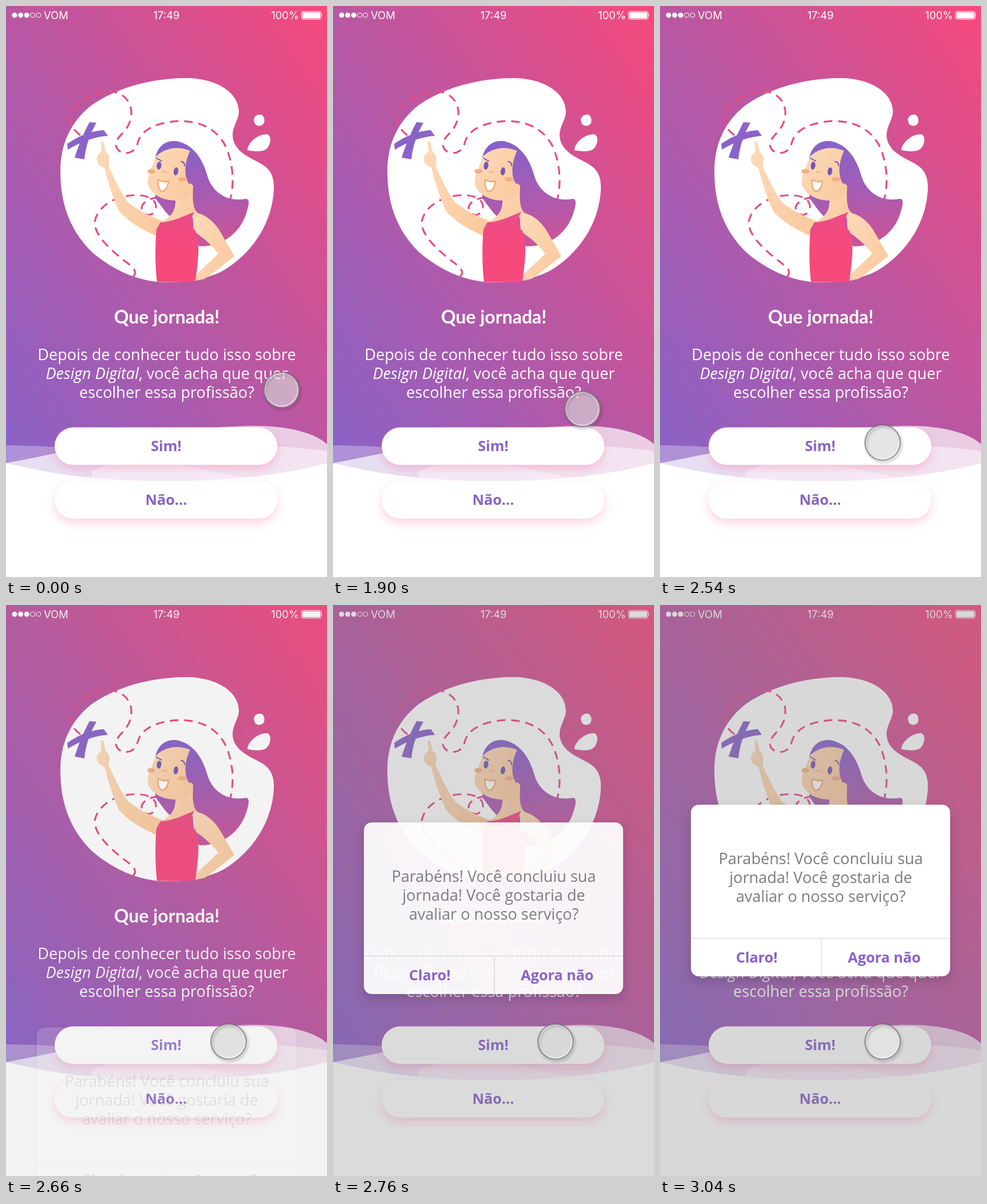
Animation, 561 px wide and 998 px high, one loop 4480 ms. Source, as an HTML page:

```html
<!DOCTYPE html>
<html lang="pt">
<head>
<meta charset="utf-8">
<style>
html, body { margin: 0; width: 100%; height: 100%; overflow: hidden; background: #fff; }
svg { display: block; width: 561px; height: 998px; }
text { font-family: "Open Sans", "Noto Sans", sans-serif; text-anchor: middle; }
.status { font: 18.4px Inter, Roboto, sans-serif; fill: #fff; }
.title { font: 700 32px Lato, "Open Sans", sans-serif; fill: #fff; }
.copy { font-size: 27.1px; }
.label { font-size: 25.2px; font-weight: 700; fill: #8862c6; }
.trail { fill: none; stroke: #ea4a82; stroke-width: 3.2; stroke-dasharray: 15 10; }
.line { fill: none; stroke-linecap: round; }
</style>
</head>
<body>
<svg viewBox="0 0 561 998">
  <defs>
    <linearGradient id="sky" x1="0" y1="1" x2="1" y2="0">
      <stop stop-color="#8663c9"/><stop offset=".55" stop-color="#be569f"/><stop offset="1" stop-color="#f6497c"/>
    </linearGradient>
    <linearGradient id="hair" gradientUnits="userSpaceOnUse" x1="300" y1="250" x2="340" y2="420">
      <stop stop-color="#8862c8"/><stop offset="1" stop-color="#c9549a"/>
    </linearGradient>
    <linearGradient id="skin" x1="0" y1="0" x2="1" y2=".6">
      <stop stop-color="#fcdabb"/><stop offset="1" stop-color="#fbcba0"/>
    </linearGradient>
    <linearGradient id="dress" x1="0" y1="0" x2="0" y2="1">
      <stop stop-color="#e94d86"/><stop offset=".5" stop-color="#f6497c"/>
    </linearGradient>
    <filter id="glow" x="-20%" y="-60%" width="140%" height="240%">
      <feDropShadow dx="0" dy="7" stdDeviation="8" flood-color="#f6497c" flood-opacity=".25"/>
    </filter>
    <filter id="shade" x="-20%" y="-20%" width="140%" height="150%">
      <feDropShadow dx="0" dy="8" stdDeviation="10" flood-opacity=".17"/>
    </filter>
    <filter id="drop" x="-30%" y="-30%" width="160%" height="160%">
      <feDropShadow dx="2" dy="3" stdDeviation="2" flood-opacity=".5"/>
    </filter>
  </defs>

  <rect width="561" height="998" fill="#fff"/>
  <rect width="561" height="835" fill="url(#sky)"/>
  <g fill="#fff">
    <path opacity=".3" d="M0 768C160 768 300 800 440 830V840H0Z"/>
    <path opacity=".7" d="M0 799C130 774 290 737 420 734C490 732 540 746 561 766V840H0Z"/>
    <path opacity=".45" d="M150 812C260 770 420 758 561 778V840H150Z"/>
    <path d="M0 799C60 812 130 830 280 830C400 830 490 818 561 799V998H0Z"/>
  </g>

  <g class="status">
    <circle cx="15" cy="16" r="4.5"/><circle cx="25.6" cy="16" r="4.5"/><circle cx="36.2" cy="16" r="4.5"/>
    <g fill="none" stroke="#fff"><circle cx="46.6" cy="16" r="4"/><circle cx="56.8" cy="16" r="4"/>
      <rect x="516.5" y="9.5" width="34" height="13.5" rx="2.5"/></g>
    <rect x="518" y="11" width="31" height="10.5" rx="1"/>
    <path d="M551.5 13.5q2 2.500 0 5.500z"/>
    <text class="status" x="66" y="22.5" style="text-anchor:start">VOM</text>
    <text class="status" x="280.5" y="22.5">17:49</text>
    <text class="status" x="512" y="22.5" style="text-anchor:end">100%</text>
  </g>

  <g fill="#fff">
    <path d="M315 126C365 126 408 150 407 186C406 200 396 210 396 226C397 256 430 266 448 277C466 288 469 305 468 322C465 375 436 424 390 456C361 476 320 483 282 483C235 483 190 464 150 430C108 388 95 340 95 288C95 240 115 200 150 173C195 142 255 126 315 126Z"/>
    <path d="M433 199C434 192 440 189 446 190C452 193 453 201 450 206C446 211 438 210 435 206Z"/>
    <path d="M422 250C424 238 440 224 456 224C464 226 464 240 456 249C450 256 432 254 422 252Z"/>
  </g>
  <path class="trail" d="M130 226C115 215 108 200 114 186C124 165 155 149 180 149C207 150 220 170 219 188C218 220 192 225 192 243C195 262 225 262 230 240C236 213 270 202 305 201C345 202 372 218 386 250C399 285 398 315 391 342"/>
  <path class="trail" d="M222 473C232 464 220 455 208 446C185 428 154 402 155 377C160 350 190 333 220 331C248 329 263 338 262 352C259 370 238 369 237 352C240 340 255 335 272 334"/>
  <g fill="#8a63c8">
    <path d="M107 241Q138 219 171 217L178 227Q145 229 108 251Z"/>
    <path d="M146 203L158 204Q140 235 137 268L120 265Q131 230 146 203Z"/>
  </g>

  <path fill="url(#hair)" d="M261 264C266 244 280 235 296 236C327 240 344 268 352 297C361 327 388 343 419 337C427 337 424 349 421 359C411 395 380 421 338 420L294 374C280 364 272 350 261 336Z"/>
  <g fill="url(#skin)">
    <path d="M296 335C297 352 294 367 270 378L300 388L336 362C326 356 326 338 327 315Z"/>
    <path d="M263 260C280 243 303 243 322 253C311 275 311 298 320 311L328 308C327 330 311 341 294 340C273 339 254 330 248 312C246 295 256 282 263 260Z"/>
    <path d="M165 239C167 235 171 236 171 241L174 255C182 261 182 270 179 279C190 303 200 325 213 343C235 360 255 369 274 376L263 402C240 392 215 378 198 359C186 334 178 306 172 283C163 280 157 273 159 265C160 259 165 257 167 253Z"/>
    <path d="M326 361C345 361 362 375 373 392L399 437C380 452 362 467 347 477L322 482C337 463 357 447 371 433C359 417 345 405 328 394Z"/>
  </g>
  <path fill="url(#hair)" d="M262 263C280 246 302 245 322 253C310 280 312 307 331 316C346 300 332 240 296 236C277 235 266 247 262 263Z"/>
  <path fill="url(#dress)" d="M270 378C287 378 307 369 329 360C321 374 322 385 331 393C339 410 337 440 331 481Q300 484 264 482C260 450 261 410 263 390Z"/>
  <g fill="#f5ae84"><ellipse cx="254" cy="289" rx="7" ry="4"/><ellipse cx="308" cy="303" rx="8" ry="4"/></g>
  <g fill="#7458b8">
    <ellipse cx="267.5" cy="279" rx="4" ry="7" transform="rotate(8 267 279)"/>
    <ellipse cx="297" cy="289" rx="4" ry="7" transform="rotate(8 297 289)"/>
  </g>
  <path class="line" stroke="#7458b8" stroke-width="2" d="M263 266L272 271M306 272Q312 272 312 279"/>
  <path class="line" stroke="#f0a878" stroke-width="1.5" d="M273 291Q277 287 281 291"/>
  <path fill="#fff" stroke="#f3ac79" stroke-width="2.5" d="M266 304Q274 309 284 306Q282 324 271 324Q264 316 266 304Z"/>

  <text class="title" x="281" y="555">Que jornada!</text>
  <g fill="#fff">
    <text class="copy" x="281" y="619">Depois de conhecer tudo isso sobre</text>
    <text class="copy" x="281" y="652"><tspan font-style="italic">Design Digital</tspan>, você acha que quer</text>
    <text class="copy" x="281" y="685">escolher essa profissão?</text>
  </g>
  <g fill="#fff" filter="url(#glow)">
    <rect x="85" y="736.5" width="389" height="65.5" rx="32.7"/>
    <rect x="85" y="830.5" width="389" height="65.5" rx="32.7"/>
  </g>
  <text class="label" x="280" y="778">Sim!</text>
  <text class="label" x="280" y="872">Não...</text>

  <rect id="dim" width="561" height="998" fill="#7d7d80"/>

  <g id="card">
    <rect x="54" y="349" width="453" height="300" rx="14" fill="#fff" filter="url(#shade)"/>
    <path d="M54 582.5H507M282 582.5V649" stroke="#dedede" stroke-width="1.5"/>
    <g fill="#7c7c80">
      <text class="copy" x="281" y="453">Parabéns! Você concluiu sua</text>
      <text class="copy" x="281" y="486">jornada! Você gostaria de</text>
      <text class="copy" x="281" y="519">avaliar o nosso serviço?</text>
    </g>
    <text class="label" x="169" y="625">Claro!</text>
    <text class="label" x="392" y="625">Agora não</text>
  </g>

  <g id="touch">
    <circle id="pad" r="30.5"/>
    <circle r="28.5" fill="none" stroke="#fff" stroke-opacity=".45" stroke-width="2.5"/>
    <circle r="30.8" fill="none" stroke="#77717a" stroke-opacity=".8" stroke-width="1.8" filter="url(#drop)"/>
  </g>
</svg>
<script>
const LOOP = 4480;
const [dim, card, touch, pad] = ["dim", "card", "touch", "pad"].map(id => document.getElementById(id));
const progress = (t, start, length) => Math.min(1, Math.max(0, (t - start) / length));
const smooth = p => p * p * (3 - 2 * p);
const mix = (a, b, p) => a + (b - a) * p;

function draw(t) {
  // x leads y, which bends the path of the touch point
  const move = progress(t, 1540, 1000);
  const x = mix(481.5, 389, smooth(move ** .69));
  const y = mix(671, 763, smooth(move ** .88));
  touch.setAttribute("transform", `translate(${x} ${y})`);

  const left = 1 - progress(t, 2640, 400);
  card.setAttribute("transform", `translate(0 ${608 * left ** 8.26})`);
  card.setAttribute("opacity", progress(t, 2640, 130));
  dim.setAttribute("opacity", .3 * (1 - left ** 7));

  const release = progress(t, 2760, 200);
  const tone = mix(215, 232, release);
  pad.setAttribute("fill", `rgba(${tone},${tone},${tone},.65)`);
}

function tick(now) {
  draw(now % LOOP);
  requestAnimationFrame(tick);
}
draw(0);
requestAnimationFrame(tick);
</script>
</body>
</html>
```
